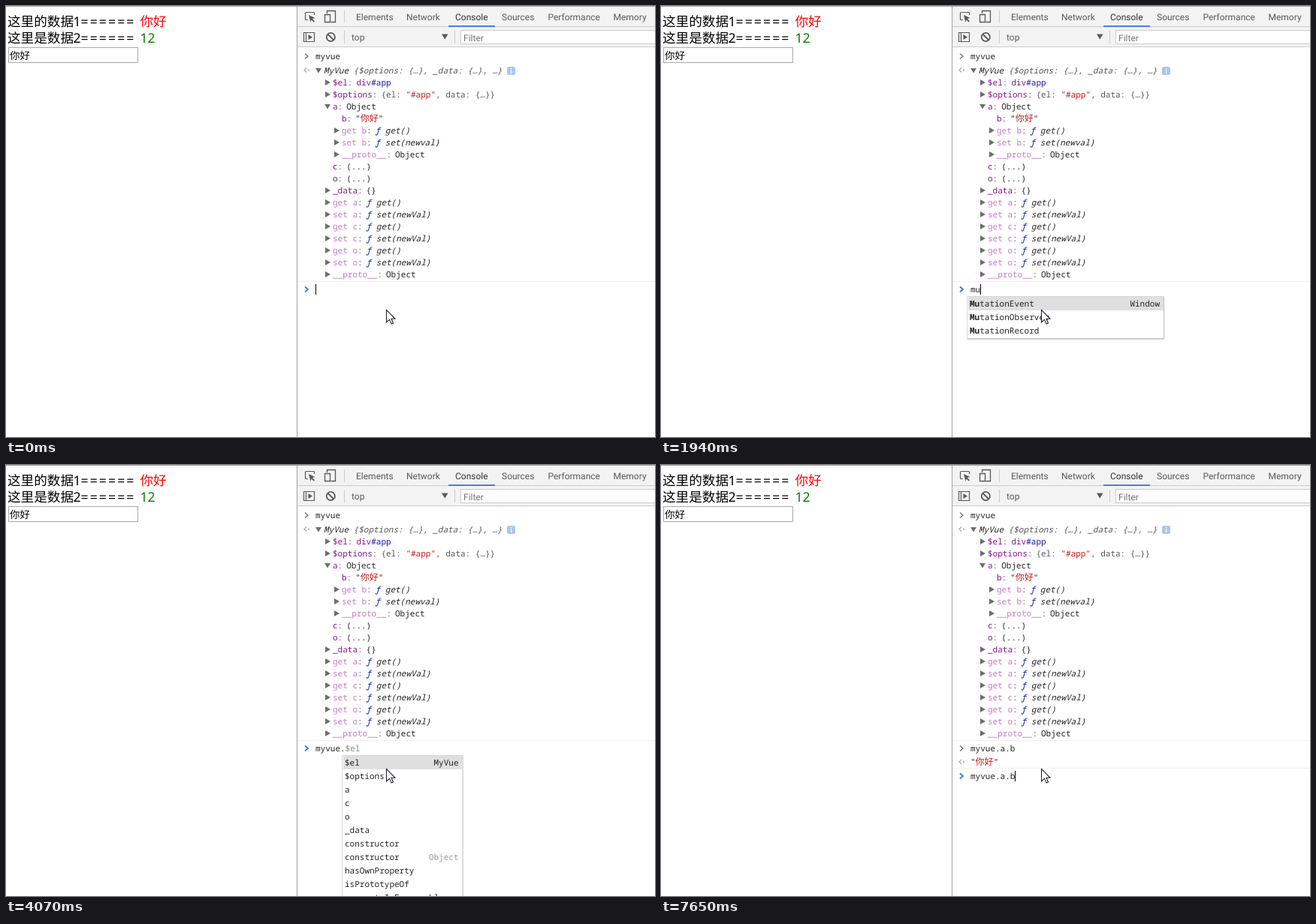
These frames come from a looping animation (864x575 px, 8 s). An HTML page:

```html
<!DOCTYPE html>
<html lang="zh">
<head>
<meta charset="utf-8">
<title>Console autocomplete</title>
<style>
html, body { margin: 0; width: 100%; height: 100%; overflow: hidden; background: #fff; }
svg { display: block; }
text { white-space: pre; text-rendering: geometricPrecision; }
.mono { font: 11px "Noto Sans Mono", "Liberation Mono", monospace; fill: #252525; }
.ui { font: 12px Roboto, sans-serif; fill: #5a5a5a; }
.page { font: 17.6px "Noto Sans CJK SC", "Noto Sans CJK", sans-serif; fill: #000; }
.latin { font-family: "Noto Sans", sans-serif; }
.cjk { font-family: "Noto Sans CJK SC", "Noto Sans CJK", sans-serif; font-size: 12px; }
.key { fill: #881391; }
.dim { fill: #c07cc6; }
.str { fill: #c41a16; }
.gray { fill: #565656; }
.ghost { fill: #8a8a8a; }
.sub { fill: #9a9a9a; }
.blue { fill: #1a1aa6; }
.fn { fill: #0d22aa; font-style: italic; }
.it { font-style: italic; }
.b { font-weight: 700; }
</style>
</head>
<body>
<svg id="stage" width="864" height="575" viewBox="0 0 864 575">
  <g id="base"></g>
  <g id="live"></g>
  <path d="M506.5 405.5v16.5l4-3.7 2.6 5.8 2.4-1.1-2.5-5.7h5z" fill="#fff" stroke="#222233" stroke-width="1.1"/>
</svg>
<script>
const CW = 6.6, ROW = 18, LOOP = 8000;
const base = document.getElementById('base');
const live = document.getElementById('live');

const span = (cls, str) => `<tspan class="${cls}">` +
  str.replace(/[\u4e00-\u9fff]+/g, m => `<tspan class="cjk">${m}</tspan>`) + '</tspan>';
const text = (x, y, body, cls = 'mono', more = '') => `<text x="${x}" y="${y}" class="${cls}" ${more}>${body}</text>`;
const rect = (x, y, w, h, fill, more = '') => `<rect x="${x}" y="${y}" width="${w}" height="${h}" fill="${fill}" ${more}/>`;
const line = (d, color, w = 1) => `<path d="${d}" fill="none" stroke="${color}" stroke-width="${w}"/>`;
const shape = (d, fill) => `<path d="${d}" fill="${fill}"/>`;
const chevron = (x, y, color, w) => line(`M${x} ${y - 3.5}l4 3.5 -4 3.5`, color, w);
const returned = y => line(`M400 ${y - 3}l-3 3 3 3`, '#aaa', 1.2) + rect(402, y - 1, 2, 2, '#aaa');
const closed = (x, y) => shape(`M${x} ${y - 4}l7 4 -7 4z`, '#6e6e6e');
const opened = (x, y) => shape(`M${x} ${y - 3}h8l-4 6.5z`, '#6e6e6e');

function page() {
  const row = (y, label, n, value, color, cls) =>
    text(2, y, label, 'page') + text(89.5, y, n, 'page latin') +
    text(99.5, y, '======', 'page latin', 'letter-spacing="2.1"') +
    text(178.5, y, value, 'page ' + cls, `style="fill:${color}"`);
  return row(27, '这里的数据', '1', '你好', 'red', '') +
    row(49, '这里是数据', '2', '12', 'green', 'latin') +
    rect(3.5, 55.5, 172, 20, '#fff', 'stroke="#a9a9a9"') +
    text(5, 70.5, '你好', 'page', 'style="font-size:13.5px"');
}

function toolbars() {
  const ink = '#5a5a5a';
  let s = rect(388, 1, 476, 54, '#f3f3f3') + rect(388, 27, 476, 1, '#ccc') + rect(388, 54, 476, 1, '#ccc') +
    rect(0, 0, 864, 1, '#a8a8a8') + rect(387, 0, 1, 575, '#a0a0a0') + rect(589, 26, 62, 2, '#4a7fdc');
  const tabs = { Elements: 466, Network: 533, Console: 598, Sources: 660, Performance: 721.5, Memory: 808.5 };
  for (const name in tabs)
    s += text(tabs[name], 19, name, 'ui', name === 'Console' ? 'style="fill:#333"' : '');
  // inspect and device icons
  s += line('M402 18.5h-2.5q-1 0-1-1v-8q0-1 1-1h10q1 0 1 1v2.5', ink, 1.2) +
    shape('M403 12l8.5 4-3.6 1.1 3.1 3.1-1.3 1.3-3.1-3.1-1.3 3.4z', ink) +
    line('M427.5 10v-3.5h11v15h-6', ink, 1.3) + line('M424.5 11.5h7v10h-7z', ink, 1.3);
  // sidebar and clear icons
  s += line('M396.5 35.5h14v12h-14zM399.5 35.5v12', ink, 1.2) + shape('M402.5 38l5.5 3.5-5.5 3.5z', ink) +
    `<circle cx="432.3" cy="41.5" r="5.6" fill="none" stroke="${ink}" stroke-width="1.8"/>` +
    line('M428.3 37.5l8 8', ink, 1.8);
  s += rect(450, 6, 1, 17, '#ccc') + rect(450, 33, 1, 17, '#ccc') + rect(597, 33, 1, 17, '#ccc') +
    text(460, 46, 'top', 'ui') + shape('M580 37.5h8.5l-4.25 7z', ink) +
    rect(605.5, 32.5, 270, 18, '#fff', 'stroke="#ccc"') +
    text(609, 47, 'Filter', 'ui', 'style="fill:#757575"');
  return s;
}

function tree() {
  const prop = (x, y, cls, name, value, mark) =>
    (mark ? mark(x - 10, y) : '') +
    text(x, y + 4, span(cls, name) + span('gray', ':')) +
    text(x + (name.length + 1) * CW + 5, y + 4, value);
  const fn = sig => span('fn', 'ƒ ') + span('it', sig);
  const accessors = (x, y, key, arg) =>
    prop(x, y, 'dim', 'get ' + key, fn('get()'), closed) +
    prop(x, y + 16, 'dim', 'set ' + key, fn(`set(${arg})`), closed);
  const open = (x, y) => opened(x - 1, y);

  let s = chevron(398, 67, '#6e6e6e', 1.3) + text(412, 71, 'myvue') + returned(85.5) + opened(412, 86) +
    text(423, 90, span('it', 'MyVue ') + span('it gray', '{$options: {…}, _data: {…}, …}')) +
    rect(667, 81, 11, 11, '#aac6f2', 'rx="2.5"') + rect(672, 83, 1.2, 1.5, '#fff') + rect(672, 85.5, 1.2, 4.5, '#fff');
  s += prop(435, 102, 'key', '$el', span('key', 'div') + span('blue', '#app'), closed) +
    prop(435, 118, 'key', '$options', span('gray', '{el: ') + span('str', '"#app"') + span('gray', ', data: {…}}'), closed) +
    prop(435, 134, 'key', 'a', 'Object', open) +
    prop(447, 150, 'key', 'b', '"' + span('str', '你好') + '"') +
    accessors(447, 166, 'b', 'newval') +
    prop(447, 198, 'dim', '__proto__', 'Object', closed) +
    prop(435, 214, 'key', 'c', '(...)') + prop(435, 230, 'key', 'o', '(...)') +
    prop(435, 246, 'key', '_data', '{}', closed);
  ['a', 'c', 'o'].forEach((k, i) => s += accessors(435, 262 + i * 32, k, 'newVal'));
  return s + prop(435, 358, 'dim', '__proto__', 'Object', closed) + rect(388, 367, 476, 1, '#f0f0f0');
}

// pre: bold characters in a name, past: bold characters in a history line ('>'), thumb: scrollbar length
const ab = ['>myvue.a.b', '>myvue.a.b = 123', '>myvue.a.b = 456', '>myvue.a.b = 1', '>myvue.a.b = 12', '>myvue.a.b = ""', '>myvue.a.b = {}'];
const proto = ['hasOwnProperty', 'isPrototypeOf', 'propertyIsEnumerable'];
const popups = {
  n: { x: 408, r: 673, pre: 1, thumb: 17, type: 'Window', rows: ['name', 'navigator', 'NFC', 'NaN', 'NamedNodeMap',
    'NavigationPreloadManager', 'Navigator', 'NetworkInformation', 'Node', 'NodeFilter', 'NodeIterator'] },
  m: { x: 408, r: 666, pre: 1, thumb: 17, type: 'Window', rows: ['matchMedia', 'menubar', 'moveBy', 'moveTo', 'myvue',
    'MIDIAccess', 'MIDIConnectionEvent', 'MIDIInput', 'MIDIInputMap', 'MIDIMessageEvent', 'MIDIOutput'] },
  mu: { x: 408, r: 669, pre: 2, type: 'Window', rows: ['MutationEvent', 'MutationObserver', 'MutationRecord'] },
  my: { x: 408, r: 663, pre: 2, past: 2, thumb: 180, type: 'Window', rows: ['myvue', 'MyVue', '>myvue', '>myvue.c.y = 456',
    '>myvue.c.y', '>myvue.c', '>myvue.c = {y:123}', '>myvue.c = 4564848', '>myvue.c = "我曹"', '>myvue.a.b', '>myvue.a.b = 123'] },
  dot: { x: 448, r: 607.5, pre: 0, type: 'MyVue', rows: ['$el', '$options', 'a', 'c', 'o', '_data', 'constructor',
    'constructor|Object', ...proto] },
  a: { x: 448, r: 610, pre: 1, past: 7, type: 'MyVue', rows: ['a', '>myvue.a', ...ab] },
  adot: { x: 461, r: 620.5, pre: 0, type: 'Object', rows: ['b', 'constructor', ...proto, 'toLocaleString', 'toString',
    'valueOf', '__defineGetter__', '__defineSetter__', '__lookupGetter__'] },
  b: { x: 461, r: 620.5, pre: 1, past: 9, type: 'Object', rows: ['b', ...ab] }
};

function popup({ x, r, pre, past, thumb, type, rows }) {
  const top = 388, w = r - x, h = rows.length * ROW + 1;
  const inner = thumb ? r - 17 : r;
  let s = rect(x - 1, top - 1, w + 2.5, h + 4, '#000', 'rx="1.5" opacity=".08"') +
    rect(x - .5, top - .5, w + 1.5, h + 2, '#000', 'rx="1" opacity=".16"') +
    rect(x, top, w, h, '#fff') + rect(x + 1, top, inner - x - 1, ROW, '#dfdfdf');
  if (thumb) {
    const mid = r - 8.5;
    s += rect(inner, top, 16, h, '#f1f1f1') + rect(inner + 2, 405, 13, thumb, '#c1c1c1') +
      shape(`M${mid - 4} 399h8l-4-4.5z`, '#a3a3a3');
  }
  rows.forEach((row, i) => {
    const y = top + i * ROW + 13, old = row[0] === '>';
    const [name, sub] = row.replace('>', '').split('|');
    const n = old ? past : pre;
    if (old) s += line(`M414 ${y - 7}l4 3.5 -4 3.5`, '#3879d9', 1.6).replace('M414', 'M' + (x + 6.5));
    s += text(x + (old ? 13 : 3), y, span('b', name.slice(0, n)) + span('', name.slice(n)));
    const right = i ? sub : type;
    if (right) s += text(inner - 5, y, right, i ? 'mono sub' : 'mono', 'text-anchor="end"');
  });
  return s;
}

// [start, typed text, completion hint, caret visible, popup, command has run]
const steps = [
  [0, '', '', 1],
  [280, '', '', 0],
  [410, 'n', '', 1],
  [560, 'n', 'ame', 1, 'n'],
  [960, '', '', 1],
  [1260, 'm', 'atchMedia', 1, 'm'],
  [1820, 'mu', '', 1, 'm'],
  [1940, 'mu', '', 1, 'mu'],
  [2340, 'm', 'atchMedia', 1, 'm'],
  [2490, 'my', 'vue', 1, 'my'],
  [2920, 'myvue', '', 1],
  [3510, 'myvue.', '$el', 1, 'dot'],
  [4070, 'myvue.', '$el', 0, 'dot'],
  [4320, 'myvue.a', '', 1, 'a'],
  [4760, 'myvue.a', '', 0, 'a'],
  [5060, 'myvue.a.', 'b', 1, 'adot'],
  [5590, 'myvue.a.', 'b', 0, 'adot'],
  [6140, 'myvue.a.', 'b', 1, 'adot'],
  [6510, 'myvue.a.b', '', 1, 'b'],
  [6790, 'myvue.a.b', '', 1],
  [6940, '', '', 1, null, true],
  [7370, '', '', 0, null, true],
  [7650, 'myvue.a.b', '', 1, null, true]
];

function prompt([, typed, hint, caret, list, ran]) {
  const y = ran ? 415 : 378;
  let s = '';
  if (ran)
    s += chevron(398, 378, '#6e6e6e', 1.3) + text(412, 382, 'myvue.a.b') + returned(396) +
      text(412, 400, '"' + span('str', '你好') + '"') + rect(388, 404, 476, 1, '#f0f0f0');
  s += chevron(398, y, '#3879d9', 1.8) + text(412, y + 4, span('', typed) + span('ghost', hint));
  if (caret) s += rect(412 + Math.round(typed.length * CW), y - 7, 1, 14, '#000');
  return s + (list ? popup(popups[list]) : '');
}

base.innerHTML = rect(0, 0, 864, 575, '#fff') + page() + toolbars() + tree();

const began = performance.now();
let shown = null;
function draw() {
  const t = (performance.now() - began) % LOOP;
  const step = steps.filter(s => s[0] <= t).pop();
  if (step !== shown) live.innerHTML = prompt(shown = step);
  requestAnimationFrame(draw);
}
draw();
</script>
</body>
</html>
```
